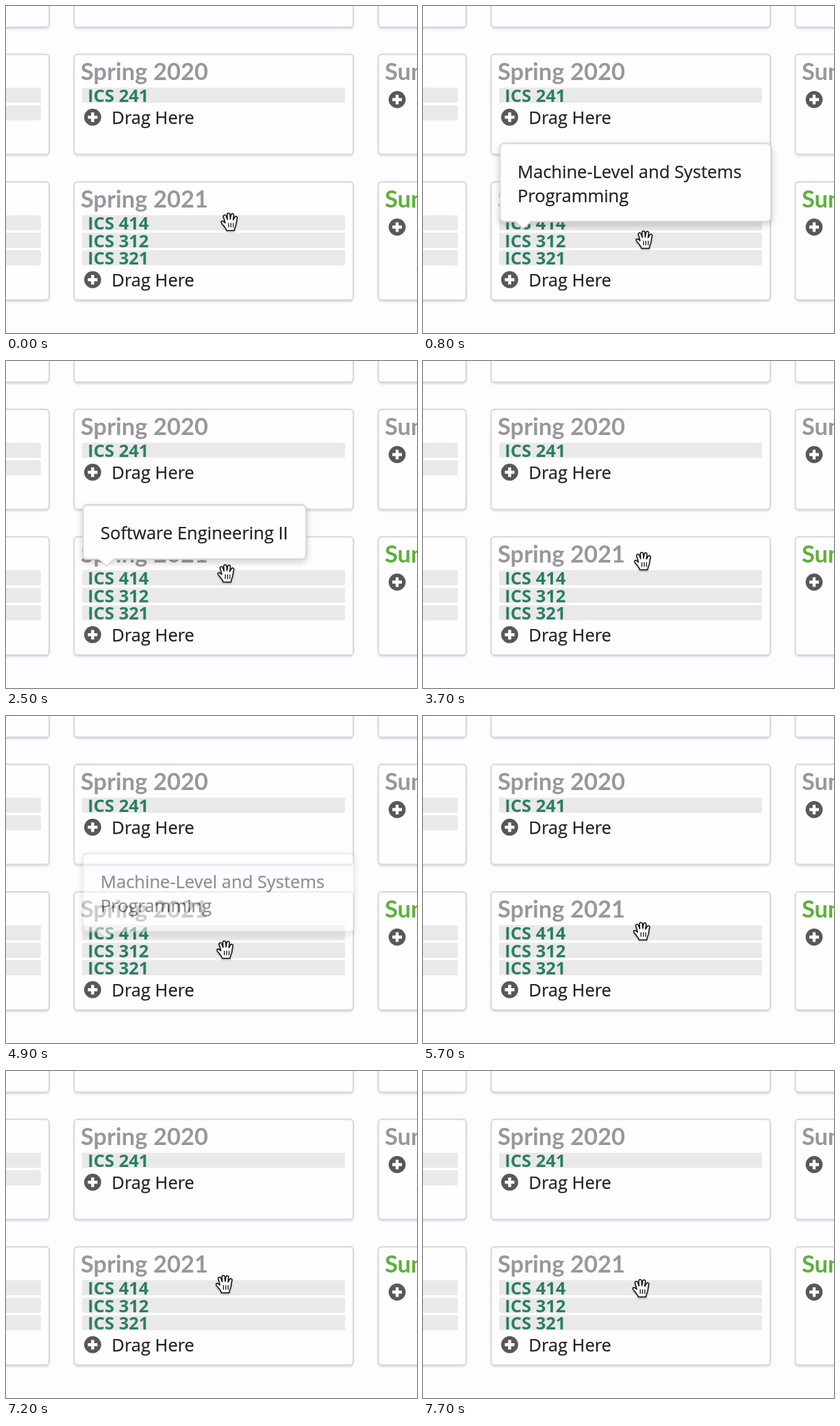
An HTML page for the animation above (8000 ms loop, 600 px wide and 477 px high).

```html
<!DOCTYPE html>
<html lang="en">
<head>
<meta charset="utf-8">
<title>Course planner</title>
<style>
html, body { margin: 0; width: 100%; height: 100%; overflow: hidden; background: #fefcff; }
svg { display: block; width: 600px; height: 477px; }
text { font-family: "Open Sans", sans-serif; font-size: 25.5px; fill: #222124; }
.body { stroke: #222124; stroke-width: .25; }
.title { font-family: Lato, sans-serif; font-size: 34.5px; font-weight: 700; fill: #98979b; }
.now { fill: #5db13a; }
.course { font-weight: 700; fill: #2b7f62; }
.card { fill: #fffdff; stroke: #d5d4d7; stroke-width: 1.8; }
.row { fill: #e9e8ea; }
</style>
</head>
<body>
<svg viewBox="0 0 600 477">
  <defs>
    <filter id="lift" x="-10%" y="-10%" width="120%" height="130%">
      <feDropShadow dx="0" dy="1.8" stdDeviation="1" flood-color="#222426" flood-opacity=".12"/>
    </filter>
    <filter id="float" x="-10%" y="-20%" width="120%" height="150%">
      <feDropShadow dx="0" dy="3.5" stdDeviation="5" flood-color="#222426" flood-opacity=".22"/>
    </filter>
    <filter id="soft" x="-30%" y="-30%" width="160%" height="170%">
      <feDropShadow dx="0" dy="1.5" stdDeviation="1" flood-color="#000" flood-opacity=".3"/>
    </filter>
  </defs>
  <g id="board"></g>
  <g id="tips"></g>
  <g id="hand" filter="url(#soft)" stroke="#111" stroke-linejoin="round" stroke-linecap="round">
    <path fill="#fff" stroke-width="1.5" d="M-4.5 12.5C-5 9.5 -7.5 7 -9.5 4.5C-11.5 2.5 -13 1 -12 -.5C-11 -2 -9 -1 -6.5 1.5C-7 -2 -8 -4.5 -9 -7.5C-9.8 -10 -6.3 -11.3 -5.2 -8.8L-3.2 -3.5L-3.6 -10.5C-3.7 -13.5 .3 -13.7 .6 -10.8L1 -4L2.2 -10.5C2.8 -13.2 6.3 -12.6 6 -9.8L5.2 -3L7.6 -7C9 -9.2 12 -7.8 11 -5.2C10 -2 10 1 9.5 3.5C9 6.5 7 9 7 12.5Z"/>
    <path fill="none" stroke-width="1.3" d="M-1.4 2v5.5m3.4 -5.5v5.5m3.4 -5.5v5.5"/>
  </g>
  <path id="arrow" filter="url(#soft)" fill="#0b0b0c" stroke="#fff" stroke-width="2" stroke-linejoin="round"
    d="M0 0V23L5.2 18.3L8.8 26.5L12.8 24.8L9.3 16.8H16.5Z"/>
</svg>
<script>
const LOOP = 8000, STEP = 100, PITCH = 25.5;
const $ = id => document.getElementById(id);
const range = n => [...Array(n).keys()];

const rect = (cls, x, y, w, h, r) =>
  `<rect class="${cls}" x="${x}" y="${y}" width="${w}" height="${h}" rx="${r}"/>`;
const text = (cls, x, y, s) => `<text class="${cls}" x="${x}" y="${y}">${s}</text>`;
const bar = (x, y, w) => rect('row', x, y, w, 22, 2);
const plus = (x, y) => `<circle cx="${x}" cy="${y}" r="12.4" fill="#58575a"/>
  <path d="M${x - 7} ${y}h14M${x} ${y - 7}v14" stroke="#fffdff" stroke-width="4.4"/>`;

// One row of the board: three columns, the outer two cut by the stage
const cards = (y, h) => [-344.5, 99.5, 543.5]
  .map(x => `<g filter="url(#lift)">${rect('card', x, y, 407.5, h, 5)}</g>`).join('');

function term(y, h, year, courses, leftRows, sideCls) {
  const top = i => y + 48.8 + i * PITCH;
  const end = top(courses.length) + 17.4;
  return cards(y, h)
    + text('title', 109, y + 37, 'Spring ' + year)
    + text('title ' + sideCls, 553, y + 37, 'Summer ' + year)
    + range(leftRows).map(i => bar(-333, top(i), 384)).join('')
    + courses.map((c, i) => bar(111, top(i), 384) + text('course', 119.3, top(i) + 21, c)).join('')
    + plus(571, y + 66) + plus(126.5, end) + text('body', 154.3, end + 9.8, 'Drag Here');
}

$('board').innerHTML = cards(-116, 147)
  + term(70.5, 146, 2020, ['ICS 241'], 2, '')
  + term(256.5, 172.5, 2021, ['ICS 414', 'ICS 312', 'ICS 321'], 3, 'now');

// Popups with the spans during which they are shown
const tips = [
  { bottom: 289, w: 326, lines: ['Software Engineering II'], on: [[1700, 3000], [6000, 6300]] },
  { bottom: 289 + PITCH, w: 396, lines: ['Machine-Level and Systems', 'Programming'],
    on: [[500, 1300], [4900, 5300], [7400, 7700]] }
];
$('tips').innerHTML = tips.map(({ bottom: b, w, lines }) => {
  const h = 44 + 35 * lines.length, y = b - h;
  return `<g><g filter="url(#float)">${rect('card', 112.5, y, w - .5, h, 6)}</g>
    <path d="M135.5 ${b}l11 10l11 -10" fill="#fffdff" stroke="#d5d4d7" stroke-width="1.4"/>
    <path d="M136 ${b - 1.5}h21v1.7h-21z" fill="#fffdff"/>
    ${lines.map((l, i) => text('body', 138, y + 50 + i * 35, l)).join('')}</g>`;
}).join('');
const tipEls = [...$('tips').children];

// Pointer stops: arrival time and height; it rests, then eases into the next
const stops = [
  [0, 315], [600, 341], [1200, 313], [1300, 317], [2500, 310], [3200, 298], [3500, 292],
  [4500, 304], [4900, 341], [5300, 317], [5700, 314], [6300, 342], [6600, 314],
  [7200, 311], [7500, 335], [7700, 317]
];
const mix = (a, b, k) => a + (b - a) * k;
const drift = t => 318 + 4.5 * (1 - t / LOOP) + 3.5 * Math.exp(-t / 400);

function pointer(t) {
  const i = stops.findLastIndex(s => s[0] <= t);
  const [t0, y0] = stops[i], [t1, y1] = stops[i + 1] || [LOOP, y0];
  const p = Math.max(0, 1 - (t1 - t) / Math.min(400, t1 - t0));
  const k = p * p * (3 - 2 * p);
  return [drift(mix(t0, t1, k)), mix(y0, y1, k)];
}

function draw(now) {
  const t = Math.floor((now % LOOP) / STEP) * STEP;
  const [x, y] = pointer(t);
  let overTip = false;
  tips.forEach((tip, i) => {
    const span = tip.on.find(([a, b]) => t >= a && t < b);
    tipEls[i].setAttribute('opacity', span ? Math.min(1, (t - span[0] + STEP) / 200) : 0);
    if (span && y < tip.bottom) overTip = true;
  });
  $('hand').setAttribute('transform', `translate(${x + .4} ${y})`);
  $('arrow').setAttribute('transform', `translate(${x} ${y})`);
  $('hand').setAttribute('display', overTip ? 'none' : 'inline');
  $('arrow').setAttribute('display', overTip ? 'inline' : 'none');
}

const start = performance.now();
function tick() {
  draw(performance.now() - start);
  requestAnimationFrame(tick);
}
tick();
</script>
</body>
</html>
```
